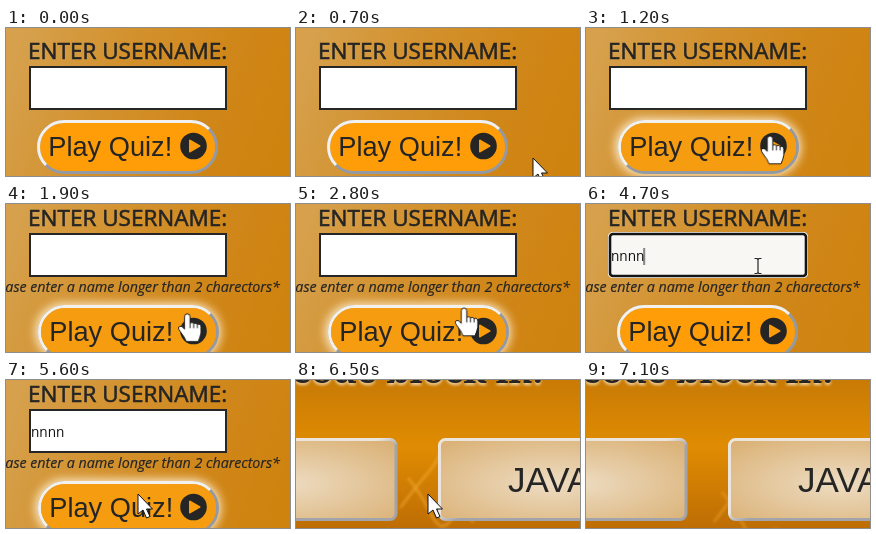
Write an HTML page that moves like this. It is 284x148 px and loops after 7.2 s.

```html
<!DOCTYPE html>
<html lang="en">
<head>
<meta charset="utf-8">
<title>Quiz start</title>
<style>
html, body { margin: 0; width: 100%; height: 100%; overflow: hidden; background: #d18a1c; }
svg { display: block; width: 284px; height: 148px; }
text { font-family: "Open Sans", sans-serif; fill: #252525; white-space: pre; }
.arial { font-family: "Liberation Sans", Arial, sans-serif; }
.title { font-size: 22.5px; stroke: #252525; stroke-width: .55px; }
.note { font-size: 14.3px; font-style: italic; stroke: #252525; stroke-width: .2px; }
.typed { font-size: 13.6px; fill: #111; }
.heading { font: 900 36px "Noto Serif", serif; text-anchor: end; }

/* every part shares one clock */
.a { animation: 7.2s step-end infinite; }
.form { animation-name: form; }
.quiz { animation-name: quiz; opacity: 0; }
.up { animation-name: up; }
.down { animation-name: down; }
.note { animation-name: note; opacity: 0; }
.focus { animation-name: focus; opacity: 0; }
.popup { animation-name: popup; opacity: 0; }
.caret { animation-name: caret; }
.c1, .c2, .c3, .c4 { fill-opacity: 0; }
.c1 { animation-name: c1; }
.c2 { animation-name: c2; }
.c3 { animation-name: c3; }
.c4 { animation-name: c4; }
.hover { animation-name: hover; animation-timing-function: linear; opacity: 0; }
.nudge { animation-name: nudge; animation-timing-function: linear; }
.cursor { animation-name: move; }
.arrow { animation-name: arrow; }
.hand { animation-name: hand; opacity: 0; }
.beam { animation-name: beam; opacity: 0; }
.embers { animation-name: drift; animation-timing-function: linear; }

@keyframes form { 0% { opacity: 1 } 81.9%, 100% { opacity: 0 } }
@keyframes quiz { 0% { opacity: 0 } 81.9%, 100% { opacity: 1 } }
@keyframes up { 0% { transform: none } 19.4%, 100% { transform: translateY(-9px) } }
@keyframes down { 0% { transform: none } 19.4%, 100% { transform: translateY(9px) } }
@keyframes note { 0% { opacity: 0 } 19.4%, 100% { opacity: 1 } }
@keyframes focus { 0% { opacity: 0 } 44.4% { opacity: 1 } 74.9%, 100% { opacity: 0 } }
@keyframes popup { 0% { opacity: 0 } 48.6% { opacity: 1 } 59.7%, 100% { opacity: 0 } }
@keyframes c1 { 0% { fill-opacity: 0 } 48.6%, 100% { fill-opacity: 1 } }
@keyframes c2 { 0% { fill-opacity: 0 } 51.3%, 100% { fill-opacity: 1 } }
@keyframes c3 { 0% { fill-opacity: 0 } 55.5%, 100% { fill-opacity: 1 } }
@keyframes c4 { 0% { fill-opacity: 0 } 59.7%, 100% { fill-opacity: 1 } }
@keyframes caret {
  0% { transform: none }
  48.6% { transform: translateX(8.3px) }
  51.3% { transform: translateX(16.7px) }
  55.5% { transform: translateX(25px) }
  59.7%, 100% { transform: translateX(33.4px) }
}
@keyframes hover {
  0%, 11.1% { opacity: 0 }
  15%, 40.2% { opacity: 1 }
  44.4%, 72.2% { opacity: 0 }
  76.3%, 100% { opacity: 1 }
}
@keyframes nudge {
  0%, 11.1% { transform: none }
  15%, 40.2% { transform: translateX(1px) }
  44.4%, 72.2% { transform: none }
  76.3%, 100% { transform: translateX(1px) }
}
@keyframes move {
  0% { transform: translate(290px, 152px) }
  5.5% { transform: translate(290px, 152px); animation-timing-function: steps(6) }
  13.8% { transform: translate(184px, 108px) }
  25% { transform: translate(184px, 108px); animation-timing-function: steps(4) }
  30.5% { transform: translate(173px, 115px) }
  38.8% { transform: translate(168px, 104px); animation-timing-function: steps(4) }
  44.4% { transform: translate(172px, 62px) }
  65.2% { transform: translate(172px, 62px); animation-timing-function: steps(7) }
  74.9% { transform: translate(132px, 114px) }
  93% { transform: translate(132px, 114px); animation-timing-function: steps(3) }
  97.2%, 100% { transform: translate(118px, 152px) }
}
@keyframes arrow {
  0% { opacity: 1 } 11.1% { opacity: 0 }
  69.4% { opacity: 1 } 72.2% { opacity: 0 }
  76.3%, 100% { opacity: 1 }
}
@keyframes hand {
  0% { opacity: 0 } 11.1% { opacity: 1 } 41.6% { opacity: 0 }
  72.2% { opacity: 1 } 76.3%, 100% { opacity: 0 }
}
@keyframes beam { 0% { opacity: 0 } 41.6% { opacity: 1 } 69.4%, 100% { opacity: 0 } }
@keyframes drift {
  0%, 81.9% { transform: translate(-8px, -6px); opacity: .5 }
  90.3% { transform: none; opacity: .75 }
  98.6%, 100% { transform: translate(24px, 14px); opacity: .6 }
}
</style>
</head>
<body>
<svg viewBox="0 0 284 148">
  <defs>
    <linearGradient id="wall" x1="0" y1=".35" x2="1" y2=".55">
      <stop offset="0" stop-color="#d6a04c"/>
      <stop offset=".35" stop-color="#d3922f"/>
      <stop offset=".7" stop-color="#d0871a"/>
      <stop offset="1" stop-color="#cf830f"/>
    </linearGradient>
    <linearGradient id="fire" x2="0" y2="1">
      <stop offset="0" stop-color="#c87a05"/>
      <stop offset=".45" stop-color="#e08c02"/>
      <stop offset="1" stop-color="#bd6d04"/>
    </linearGradient>
    <linearGradient id="bevel" x2="1" y2="1">
      <stop offset=".46" stop-color="#ebe5de"/>
      <stop offset=".54" stop-color="#a3a3aa"/>
    </linearGradient>
    <radialGradient id="cream" cx=".5" cy=".55" r=".75">
      <stop offset="0" stop-color="#eddcc2"/>
      <stop offset="1" stop-color="#d9ae70"/>
    </radialGradient>
    <filter id="blur" x="-20%" y="-50%" width="140%" height="200%"><feGaussianBlur stdDeviation="5"/></filter>
    <filter id="soft" x="-20%" y="-50%" width="140%" height="200%"><feGaussianBlur stdDeviation="1.5"/></filter>
    <!-- top and left sides, mitred at the corners -->
    <clipPath id="lit"><path d="M31 92H212L185 119H58L31 146Z"/></clipPath>
    <rect id="pill" x="32.5" y="93.5" width="178" height="51" rx="25.5" stroke-width="3"/>
    <path id="ibeam" d="M-3.5-7.5H-1L0-6.5L1-7.5H3.5M0-6.5V6.5M-3.5 7.5H-1L0 6.5L1 7.5H3.5"/>
  </defs>

  <g class="a form">
    <rect width="284" height="148" fill="url(#wall)"/>

    <g class="a up">
      <text class="title" x="22" y="31">ENTER USERNAME:</text>
      <rect x="24" y="39" width="196" height="42" fill="#fff" stroke="#262626" stroke-width="2"/>
      <g class="a focus">
        <rect x="22.5" y="37.5" width="199" height="45" rx="4" fill="#f8f7f3" stroke="#fff"/>
        <rect x="24" y="39" width="196" height="42" rx="3" fill="none" stroke="#141414" stroke-width="2.6"/>
        <path class="a caret" d="M24.8 53V70" stroke="#111"/>
      </g>
      <text class="typed" x="25" y="66"><tspan class="a c1">n</tspan><tspan class="a c2">n</tspan><tspan class="a c3">n</tspan><tspan class="a c4">n</tspan></text>
    </g>

    <text class="a note" x="274" y="88" text-anchor="end">*Please enter a name longer than 2 charectors*</text>

    <g class="a down">
      <g class="a hover">
        <rect x="29" y="90" width="186" height="58" rx="29" fill="#fbe6c0" filter="url(#blur)"/>
      </g>
      <g class="a nudge">
        <use href="#pill" fill="#ff9d08" stroke="#949aa3"/>
        <use href="#pill" fill="none" stroke="#f3f1ee" clip-path="url(#lit)"/>
        <rect class="a hover" x="34" y="95" width="175" height="48" rx="24" fill="#f59c10"/>
        <text class="arial" x="42.3" y="128" font-size="27.2">Play Quiz!</text>
      </g>
      <circle cx="187.5" cy="118" r="13.3" fill="#252525"/>
      <path d="M184 112.5L193.5 118L184 123.5Z" fill="#fb9d0b" stroke="#fb9d0b" stroke-width="2" stroke-linejoin="round"/>
    </g>

    <g class="a popup">
      <path d="M98 82H114L122 74.5L130 82H181Q185 82 185 86V150H94V86Q94 82 98 82Z" fill="#fff"/>
      <text x="109" y="118" font-size="15.8">nnn</text>
    </g>
  </g>

  <g class="a quiz">
    <rect width="284" height="148" fill="url(#fire)"/>
    <g class="a embers" fill="none" stroke="#f5ad35" stroke-width="2" filter="url(#soft)">
      <path d="M104 128Q122 104 131 94T148 66"/>
      <path d="M112 98Q124 112 134 132T150 144"/>
      <path d="M150 146Q162 128 178 142"/>
    </g>
    <text class="heading" x="247" y="5" style="fill:#f3d9aa" filter="url(#soft)">code block in.</text>
    <text class="heading" x="247" y="3">code block in.</text>
    <g fill="url(#cream)" stroke="url(#bevel)" stroke-width="3">
      <rect x="-120" y="59.5" width="220" height="80" rx="6"/>
      <rect x="143.5" y="59.5" width="220" height="80" rx="6"/>
    </g>
    <text class="arial" x="212" y="112" font-size="35">JAVASCRIPT</text>
  </g>

  <g class="a cursor">
    <path class="a arrow" d="M0 0V20L5 16L8.5 24L12 22.5L8.5 15H14.5Z" fill="#fff" stroke="#111"/>
    <g class="a hand" stroke="#111">
      <g transform="scale(.92 .96)">
        <path d="M-3 3Q-3 0 0 0T3 3V10Q5 8 7 10Q9 9 11 11Q15 10 15 14V20Q14 24 12 29H-1Q-3 24-8 18Q-11 14-8 13Q-6 12-3 16Z" fill="#fff"/>
        <path d="M3 10V15M7 10.5V15M11 11.5V15" fill="none"/>
      </g>
    </g>
    <g class="a beam" fill="none">
      <use href="#ibeam" stroke="#fff" stroke-opacity=".5" stroke-width="2.4"/>
      <use href="#ibeam" stroke="#222" stroke-width="1.2"/>
    </g>
  </g>
</svg>
</body>
</html>
```
